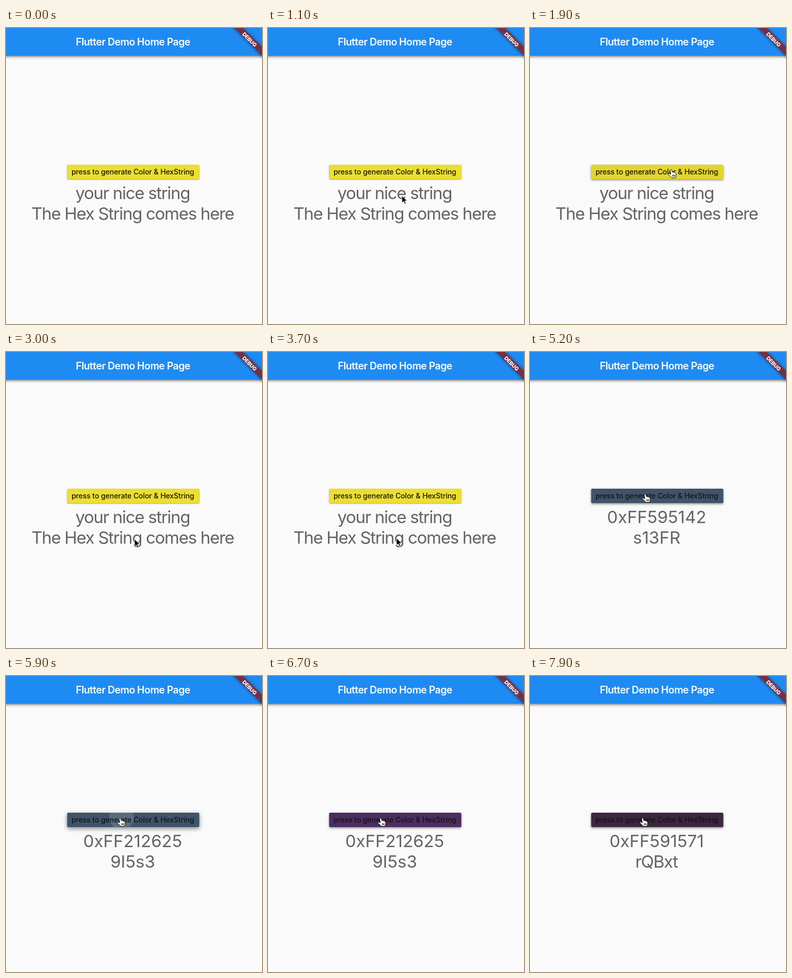
An HTML page that plays this animation: 496x576 px, repeating every 8000 ms.

```html
<!DOCTYPE html>
<html lang="en">
<head>
<meta charset="utf-8">
<title>Flutter Demo Home Page</title>
<style>
html, body { margin: 0; width: 100%; height: 100%; overflow: hidden; background: #fafafa; }
svg { display: block; width: 496px; height: 576px; }
text { font-family: Inter, Roboto, sans-serif; text-anchor: middle; }
.bar { fill: #1e8bf3; filter: drop-shadow(0 2px 2.5px rgba(0,0,0,.5)); }
.title { font-size: 19.4px; font-weight: 600; letter-spacing: -.5px; fill: #fff; }
.ribbon rect { fill: #763044; filter: drop-shadow(0 0 3px rgba(0,0,0,.5)); }
.ribbon text { font-size: 10.2px; font-weight: 800; letter-spacing: -.1px; fill: #fff; }
.label { font-size: 14px; font-weight: 500; letter-spacing: -.06px; fill: #131313; }
.line { font-size: 33px; letter-spacing: -1.3px; fill: #646464; }
.code { letter-spacing: 0; }

.button, .ripple, .cursor, .state, .arrow, .hand { animation: 8s step-end infinite; }
.button { animation-name: button; }
.cursor { animation-name: move; }
.arrow { animation-name: arrow; }
.hand { animation-name: hand; visibility: hidden; }
.ripple { animation-name: ripple; fill: #c8c8c8; transform-origin: 224px 275px; }
.s0 { animation-name: s0; }
.s1 { animation-name: s1; }
.s2 { animation-name: s2; }
.s3 { animation-name: s3; }

@keyframes s0 { 0% { visibility: visible } 55%, 100% { visibility: hidden } }
@keyframes s1 { 0% { visibility: hidden } 55% { visibility: visible } 73.75%, 100% { visibility: hidden } }
@keyframes s2 { 0% { visibility: hidden } 73.75% { visibility: visible } 90%, 100% { visibility: hidden } }
@keyframes s3 { 0% { visibility: hidden } 90%, 100% { visibility: visible } }

/* rest, hover and pressed elevations; colours blend over 200 ms */
@keyframes button {
  0%, 32.5% { fill: #ecdf30; filter: drop-shadow(0 1px 1px rgba(0,0,0,.38)) }
  16.25% { fill: #ecdf30; filter: drop-shadow(0 1px 1px rgba(0,0,0,.38)); animation-timing-function: steps(2) }
  18.75% { fill: #e3d52f; filter: drop-shadow(0 2px 2px rgba(0,0,0,.42)) }
  30% { fill: #e3d52f; filter: drop-shadow(0 2px 2px rgba(0,0,0,.42)); animation-timing-function: steps(2) }
  51.25% { fill: #ecdf30; filter: drop-shadow(0 1px 1px rgba(0,0,0,.38)); animation-timing-function: steps(2) }
  53.75% { fill: #dccf33; filter: drop-shadow(0 3px 4px rgba(0,0,0,.46)) }
  55% { fill: #dccf33; filter: drop-shadow(0 3px 4px rgba(0,0,0,.46)); animation-timing-function: steps(2) }
  57.5% { fill: #3f5469; filter: drop-shadow(0 2px 2px rgba(0,0,0,.42)) }
  72.5% { fill: #3f5469; filter: drop-shadow(0 3px 4px rgba(0,0,0,.46)) }
  73.75% { fill: #3f5469; filter: drop-shadow(0 3px 4px rgba(0,0,0,.46)); animation-timing-function: steps(2) }
  76.25% { fill: #4c2d60; filter: drop-shadow(0 2px 2px rgba(0,0,0,.42)) }
  88.75% { fill: #4c2d60; filter: drop-shadow(0 3px 4px rgba(0,0,0,.46)) }
  90% { fill: #4c2d60; filter: drop-shadow(0 3px 4px rgba(0,0,0,.46)); animation-timing-function: steps(2) }
  92.5%, 100% { fill: #3c2640; filter: drop-shadow(0 2px 2px rgba(0,0,0,.42)) }
}
@keyframes ripple {
  0%, 57.5%, 76.25%, 92.5%, 100% { opacity: 0; transform: scale(1) }
  53.75% { opacity: .3; transform: scale(1); animation-timing-function: steps(3) }
  57.4% { opacity: 0; transform: scale(4) }
  72.5%, 88.75% { opacity: .3; transform: scale(1); animation-timing-function: steps(3) }
  76.2%, 92.45% { opacity: 0; transform: scale(4) }
}
@keyframes move {
  0% { transform: translate(-40px, 506px) }
  1.25% { transform: translate(48px, 506px); animation-timing-function: steps(8) }
  11.25% { transform: translate(250px, 366px) }
  12.5% { transform: translate(254px, 347px); animation-timing-function: steps(3) }
  16.25% { transform: translate(270px, 284px); animation-timing-function: steps(6) }
  23.75% { transform: translate(273px, 276px); animation-timing-function: steps(4) }
  28.75% { transform: translate(272px, 280px); animation-timing-function: steps(4) }
  33.75% { transform: translate(252px, 352px); animation-timing-function: steps(3) }
  37.5% { transform: translate(249px, 364px) }
  46.25% { transform: translate(249px, 362px); animation-timing-function: steps(5) }
  52.5% { transform: translate(223px, 276px) }
  65% { transform: translate(223px, 277px); animation-timing-function: steps(15) }
  83.75%, 100% { transform: translate(218px, 277px) }
}
@keyframes arrow {
  0%, 30% { visibility: visible }
  16.25%, 51.25%, 100% { visibility: hidden }
}
@keyframes hand {
  0%, 30% { visibility: hidden }
  16.25%, 51.25%, 100% { visibility: visible }
}
</style>
</head>
<body>
<svg viewBox="0 0 496 576">
  <clipPath id="face"><rect x="118.5" y="266" width="256" height="28" rx="2"/></clipPath>
  <rect class="bar" x="-10" y="-10" width="516" height="64"/>
  <text class="title" x="246" y="34">Flutter Demo Home Page</text>
  <g class="ribbon" transform="translate(498.5 0) rotate(45)">
    <rect x="-50" y="28" width="100" height="12"/>
    <text x="-3" y="38.4">DEBUG</text>
  </g>

  <rect class="button" x="118.5" y="266" width="256" height="28" rx="2"/>
  <g clip-path="url(#face)"><circle class="ripple" cx="224" cy="275" r="12"/></g>
  <text class="label" x="245.8" y="285">press to generate Color &amp; HexString</text>

  <g class="state s0">
    <text class="line" x="245.3" y="333">your nice string</text>
    <text class="line" x="245.3" y="373">The Hex String comes here</text>
  </g>
  <g class="state s1">
    <text class="line code" x="245.5" y="333">0xFF595142</text>
    <text class="line code" x="245.5" y="373">s13FR</text>
  </g>
  <g class="state s2">
    <text class="line code" x="245.5" y="333">0xFF212625</text>
    <text class="line code" x="245.5" y="373">9I5s3</text>
  </g>
  <g class="state s3">
    <text class="line code" x="245.5" y="333">0xFF591571</text>
    <text class="line" x="245" y="373">rQBxt</text>
  </g>

  <g class="cursor" stroke-linejoin="round">
    <path class="arrow" fill="#000" stroke="#fff" d="M0 0V14.5L3.4 11.4 5.8 16.8 8.2 15.7 5.8 10.5H10.2Z"/>
    <g class="hand" stroke="#000">
      <path fill="#fff" d="M-1.6 1C-1.8-.8 1.2-1.2 1.7 .8L2.6 4.6C3.4 3.6 5.2 4 5.4 5.2C6.4 4.4 7.8 5 8 6.2C9.2 5.8 10 6.6 10 7.8V11C10 13 8.8 14 8.6 15.6H1.6C1 14-2.6 11.6-4.6 9.2C-5.8 7.6-3.8 6.4-2.2 7.6L-.4 8.6Z"/>
      <path fill="none" d="M3.2 9.5v3.8M5.2 9.5v3.8M7.2 9.5v3.8"/>
    </g>
  </g>
</svg>
</body>
</html>
```
